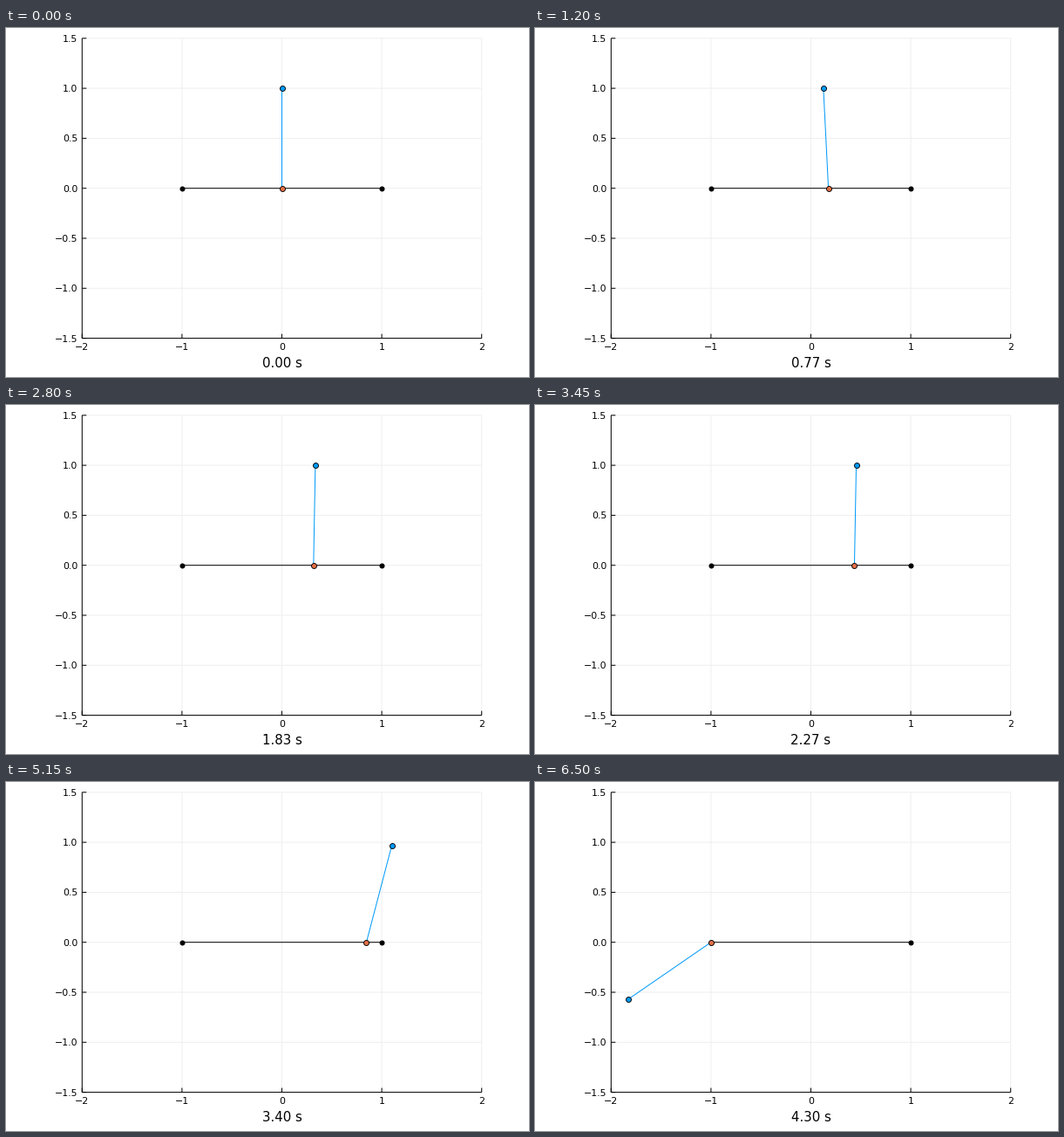
Recreate the animation shown at these times as a matplotlib script. Size 600 by 400 pixels, loop 6550 ms.

```python
import numpy as np
import matplotlib.pyplot as plt
from matplotlib.animation import FuncAnimation

W, H, DPI = 600, 400, 100
PX = 72 / DPI
FRAMES, STEP_MS, FPS = 131, 50, 30
BLUE, ORANGE, GRID = "#009AFA", "#E36F47", "#efefef"
TICK_SIZE, CLOCK_SIZE = 11, 15
SETTLE, TOPPLE = 1.2, 3.7  # seconds

plt.rcParams["font.family"] = "DejaVu Sans"
plt.rcParams["path.snap"] = False


def smooth(u):
    u = np.clip(u, 0, 1)
    return u * u * (3 - 2 * u)


def pose(t):
    """Cart position and pole angle (clockwise from upright) at time t."""
    s = t - TOPPLE
    wobble = 0.08 * np.sin(2 * np.pi * min(t / SETTLE, 1))
    lean = 0.018 * min(t / SETTLE, 1)
    fall = 1.17 * np.clip(1 + s / 0.85, 0, 1) ** 3.65 + 4.87 * max(s, 0)

    # The cart backs off, drifts right ever faster, then is flung to the left stop.
    drift = (0.2744 - 0.1821 * t + 0.112 * t * t) * smooth((t - 0.3) / 0.6)
    fling = 0.345 * np.exp(4 * s)
    x = max(drift - fling * smooth(t) - max(wobble, 0), -1)
    return x, wobble + lean + fall


def X(x):
    return 316.5 + 114.6 * x


def Y(y):
    return 183.7 - 114.6 * y


fig = plt.figure(figsize=(W / DPI, H / DPI), dpi=DPI, facecolor="white")
ax = fig.add_axes([0, 0, 1, 1])
ax.set_xlim(0, W)
ax.set_ylim(H, 0)
ax.axis("off")


def line(xs, ys, color="black", z=2):
    return ax.plot(xs, ys, color=color, lw=PX, zorder=z,
                   solid_capstyle="butt")[0]


def dot(x, y, color, edge=0.9, z=5):
    return ax.plot([x], [y], "o", ms=6 * PX, mfc=color, mec="black",
                   mew=edge * PX, zorder=z)[0]


def label(x, y, s, size, ha="center"):
    return ax.text(x, y, s, fontsize=size * PX, ha=ha, va="baseline", color="black")


def number(v, digits):
    return f"{v:.{digits}f}".replace("-", "\u2212")


left, right, top, bottom = X(-2), X(2), Y(1.5), Y(-1.5)

for v in range(-2, 3):
    line([X(v)] * 2, [top, bottom], GRID, z=1)
    line([X(v)] * 2, [bottom, bottom - 5])
    label(X(v), 369.2, number(v, 0), TICK_SIZE)

for v in np.arange(-1.5, 1.6, 0.5):
    line([left, right], [Y(v)] * 2, GRID, z=1)
    line([left, left + 5], [Y(v)] * 2)
    label(82.3, Y(v) + 4, number(v, 1), TICK_SIZE, "right")

line([left, left], [top, bottom])
line([left, right], [bottom, bottom])

line([X(-1), X(1)], [Y(0)] * 2, z=3)
for end in (-1, 1):
    dot(X(end), Y(0), "black", edge=0, z=3)

rod = line([], [], BLUE, z=4)
bob = dot(X(0), Y(1), BLUE)
cart = dot(X(0), Y(0), ORANGE, z=6)
clock = label(X(0), 389, "", CLOCK_SIZE)


def update(n):
    t = max(n - 1, 0) / FPS
    x, angle = pose(t)
    cx, cy = X(x), Y(0)
    bx, by = X(x + np.sin(angle)), Y(np.cos(angle))
    rod.set_data([cx, bx], [cy, by])
    bob.set_data([bx], [by])
    cart.set_data([cx], [cy])
    clock.set_text(f"{t:.2f} s")
    return rod, bob, cart, clock


anim = FuncAnimation(fig, update, frames=FRAMES, interval=STEP_MS,
                     repeat=True, repeat_delay=0, blit=False)
plt.show()
```
